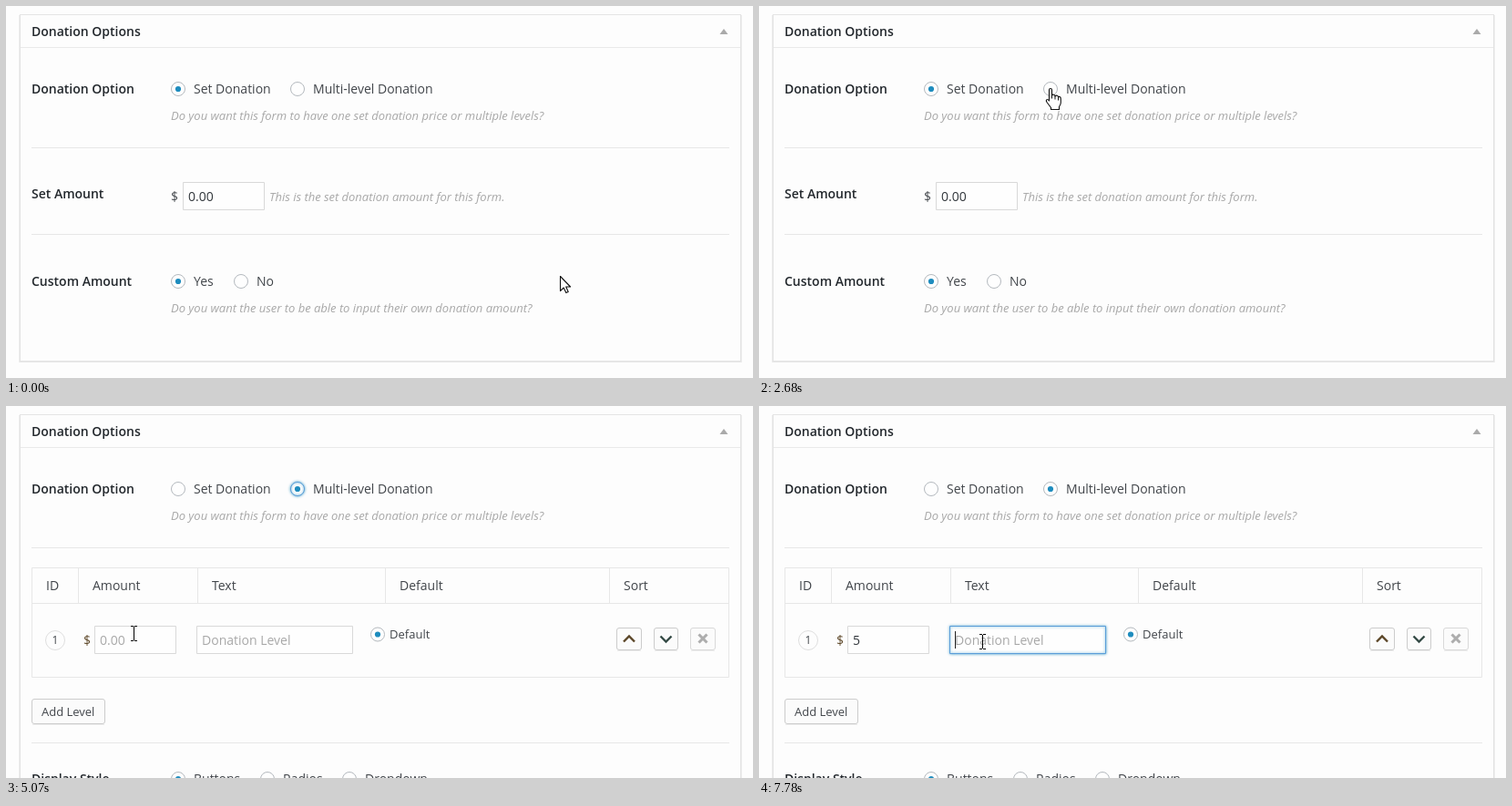
An HTML page with a canvas that plays this animation: 820 px wide and 408 px high, repeating every 8000 ms.

```html
<!DOCTYPE html>
<html lang="en">
<head>
<meta charset="utf-8">
<title>Donation options</title>
<style>
html, body { margin: 0; width: 100%; height: 100%; overflow: hidden; background: #fdfdfd; }
canvas { display: block; width: 820px; height: 408px; }
</style>
</head>
<body>
<canvas id="stage" width="820" height="408"></canvas>
<script>
const ctx = document.getElementById('stage').getContext('2d');
const LOOP = 8000;
const LINE = '#e7e7e7', INK = '#23282d', LABEL = '#41454a', MUTED = '#a8a8a8', BLUE = '#1e8cbe';

// Pointer positions are held until the next entry: time, shape, hotspot x, y.
const pointerTrack = [
  [0, 'arrow', 608, 296],
  [540, 'arrow', 568, 265], [660, 'arrow', 451, 195],
  [780, 'arrow', 390, 157], [900, 'arrow', 379, 150],
  [1150, 'arrow', 358, 142], [1270, 'beam', 312, 117],
  [1430, 'hand', 257, 98], [1570, 'hand', 241, 92], [1700, 'hand', 235, 89],
  [2200, 'hand', 240, 89], [2320, 'hand', 262, 90], [2440, 'hand', 291, 91],
  [2560, 'hand', 314, 90], [2680, 'hand', 320, 90],
  [4350, 'hand', 318, 94], [4470, 'arrow', 302, 110], [4590, 'arrow', 262, 144],
  [4710, 'arrow', 205, 178], [4830, 'arrow', 156, 202],
  [4950, 'beam', 137, 238], [5070, 'beam', 140, 249],
  [5190, 'beam', 128, 255], [5310, 'beam', 134, 258],
  [6980, 'beam', 155, 267], [7120, 'beam', 176, 267],
  [7240, 'beam', 215, 265], [7370, 'beam', 241, 260], [7490, 'beam', 245, 258]
];

function text(str, x, y, color = LABEL, font = '14px') {
  ctx.font = `${font} "Open Sans", sans-serif`;
  ctx.fillStyle = color;
  ctx.fillText(str, x, y);
}
const title = (str, y) => text(str, 28, y, INK, '600 14px');
const hint = (str, x, y) => text(str, x, y, MUTED, 'italic 13px');

function fill(x, y, w, h, color) {
  ctx.fillStyle = color;
  ctx.fillRect(x, y, w, h);
}

function frame(x, y, w, h, color, background, radius = 0) {
  ctx.beginPath();
  ctx.roundRect(x + .5, y + .5, w - 1, h - 1, radius);
  if (background) {
    ctx.fillStyle = background;
    ctx.fill();
  }
  ctx.strokeStyle = color;
  ctx.lineWidth = 1;
  ctx.stroke();
}

function withGlow(on, draw) {
  ctx.save();
  if (on) {
    ctx.shadowColor = 'rgba(30,140,190,.8)';
    ctx.shadowBlur = 3;
  }
  draw();
  ctx.restore();
}

function field(x, y, w, str, color, focused = false) {
  withGlow(focused, () => frame(x, y, w, 31, focused ? '#5b9dd9' : '#d9d9d9', '#fefefe'));
  text(str, x + 6, y + 21, color);
}

function radio(x, y, checked, focused = false) {
  withGlow(focused, () => {
    ctx.beginPath();
    ctx.arc(x, y, 7.5, 0, Math.PI * 2);
    ctx.fillStyle = '#fefefe';
    ctx.fill();
    ctx.strokeStyle = focused ? '#5b9dd9' : '#b4b9be';
    ctx.lineWidth = 1;
    ctx.stroke();
  });
  if (!checked) return;
  ctx.beginPath();
  ctx.arc(x, y, 3.1, 0, Math.PI * 2);
  ctx.fillStyle = BLUE;
  ctx.fill();
}

function option(x, y, str, checked, focused) {
  radio(x, y, checked, focused);
  text(str, x + 17, y + 5);
}

function polyline(points, color, width) {
  ctx.beginPath();
  points.forEach(([x, y]) => ctx.lineTo(x, y));
  ctx.strokeStyle = color;
  ctx.lineWidth = width;
  ctx.stroke();
}

function button(x, y, w, h, color = '#cccccc') {
  fill(x + 1, y + h, w - 2, 1, '#ededed');
  frame(x, y, w, h, color, '#fbfbfb', 2.5);
}

function drawPanel(expanded) {
  const bottom = expanded ? 408 : 391;
  fill(0, 0, 820, 408, '#fdfdfd');
  fill(14, 10, 1, bottom - 10, '#ededed');
  fill(15, 9, 1, bottom - 9, '#e3e3e3');
  fill(806, 9, 1, bottom - 9, '#e3e3e3');
  fill(807, 10, 1, bottom - 10, '#ededed');
  fill(15, 9, 792, 1, '#e5e5e5');
  fill(16, 45, 790, 1, '#e9e9e9');
  if (!expanded) {
    fill(15, 389, 792, 1, '#e3e3e3');
    fill(15, 390, 792, 1, '#e9e9e9');
  }
  title('Donation Options', 33);
  ctx.beginPath();
  ctx.moveTo(788, 25);
  ctx.lineTo(792.5, 31);
  ctx.lineTo(783.5, 31);
  ctx.fillStyle = '#aaaaaa';
  ctx.fill();
}

function drawDonationOption(multi, focused) {
  title('Donation Option', 96);
  option(189, 91, 'Set Donation', !multi);
  option(320, 91, 'Multi-level Donation', multi, focused);
  hint('Do you want this form to have one set donation price or multiple levels?', 181, 125);
  fill(28, 155, 766, 1, LINE);
}

function drawSetFields() {
  title('Set Amount', 211);
  text('$', 181, 214);
  field(194, 193, 90, '0.00', '#32373c');
  hint('This is the set donation amount for this form.', 289, 214);
  fill(28, 250, 766, 1, LINE);
  title('Custom Amount', 307);
  option(189, 302, 'Yes', true);
  option(258, 302, 'No', false);
  hint('Do you want the user to be able to input their own donation amount?', 181, 336);
}

function drawLevels(t) {
  const typed = t >= 6610;
  const onAmount = t >= 5460 && t < 7780;
  const onText = t >= 7780;

  frame(28, 177, 766, 121, LINE);
  fill(28, 216, 766, 1, LINE);
  [79, 210, 416, 662].forEach(x => fill(x, 177, 1, 39, LINE));
  [['ID', 44], ['Amount', 95], ['Text', 226], ['Default', 432], ['Sort', 678]]
    .forEach(([str, x]) => text(str, x, 202));

  ctx.beginPath();
  ctx.arc(54, 257, 10.5, 0, Math.PI * 2);
  ctx.strokeStyle = '#dfdfdf';
  ctx.lineWidth = 1;
  ctx.stroke();
  text('1', 50.5, 261, LABEL, '12px');

  text('$', 85, 262, '#5b4526');
  field(97, 241, 90, typed ? '5' : '0.00', typed ? '#32373c' : MUTED, onAmount);
  field(209, 241, 172, 'Donation Level', MUTED, onText);
  radio(408, 250.5, true);
  text('Default', 421, 255, LABEL, '13px');

  button(670, 243, 28, 25);
  button(711, 243, 27, 25);
  button(751, 243, 28, 25, '#d9d9d9');
  polyline([[678, 258.5], [684, 252.5], [690, 258.5]], '#5a4526', 2.4);
  polyline([[718.5, 252.5], [724.5, 258.5], [730.5, 252.5]], '#344a45', 2.4);
  polyline([[760.5, 250.5], [769.5, 259.5]], '#adadad', 3);
  polyline([[769.5, 250.5], [760.5, 259.5]], '#adadad', 3);

  button(28, 321, 81, 28);
  text('Add Level', 39, 340, LABEL, '13px');
  fill(28, 369, 766, 1, LINE);

  title('Display Style', 414);
  option(189, 409, 'Buttons', true);
  option(287, 409, 'Radios', false);
  option(377, 409, 'Dropdown', false);
  drawCaret(t);
}

function drawCaret(t) {
  const blinkedOff = (t >= 6090 && t < 6610) || (t >= 7120 && t < 7640);
  if (t < 5590 || blinkedOff) return;
  const x = t >= 7780 ? 215 : t >= 6610 ? 111 : 103;
  fill(x, 247, 1, 19, '#222');
}

const pointers = {
  arrow: new Path2D('M.5 .5V16.5L4.2 13L6.8 18.6L9.2 17.5L6.7 12H11.6Z'),
  hand: new Path2D('M-1.5 2Q-1.5 .5 0 .5Q1.5 .5 1.5 2V8Q2 7 3.5 7.2Q5 7.4 5 9' +
    'Q6 7.8 7.4 8.3Q8.5 8.8 8.5 10Q9.5 9 10.5 9.8Q11.3 10.4 11.3 12V16' +
    'Q11.3 18 9.5 20.5V23.5H.5V21.5L-4 15.5Q-5.3 13.5 -4 12.6Q-3 12 -1.5 14Z')
};

function drawPointer(t) {
  const [, kind, x, y] = pointerTrack.findLast(entry => entry[0] <= t);
  if (kind === 'beam') {
    fill(x, y - 7, 1, 15, '#000');
    [-8, 8].forEach(dy => {
      fill(x - 3, y + dy, 3, 1, '#000');
      fill(x + 1, y + dy, 3, 1, '#000');
    });
    return;
  }
  ctx.save();
  ctx.translate(x, y);
  ctx.lineJoin = 'round';
  ctx.lineWidth = 1.1;
  ctx.fillStyle = '#fff';
  ctx.strokeStyle = '#111';
  ctx.fill(pointers[kind]);
  ctx.stroke(pointers[kind]);
  if (kind === 'hand') {
    [[1.5, 8], [5, 9], [8.5, 10]].forEach(([px, py]) =>
      polyline([[px, py], [px, py + 3.5]], '#111', 1));
  }
  ctx.restore();
}

function draw(t) {
  const expanded = t >= 3570;
  drawPanel(expanded);
  drawDonationOption(t >= 3440, t >= 3440 && t < 5460);
  if (expanded) drawLevels(t);
  else drawSetFields();
  drawPointer(t);
}

let start;
function tick(now) {
  start ??= now;
  draw(Math.max(0, now - start) % LOOP);
  requestAnimationFrame(tick);
}
requestAnimationFrame(tick);
</script>
</body>
</html>
```
